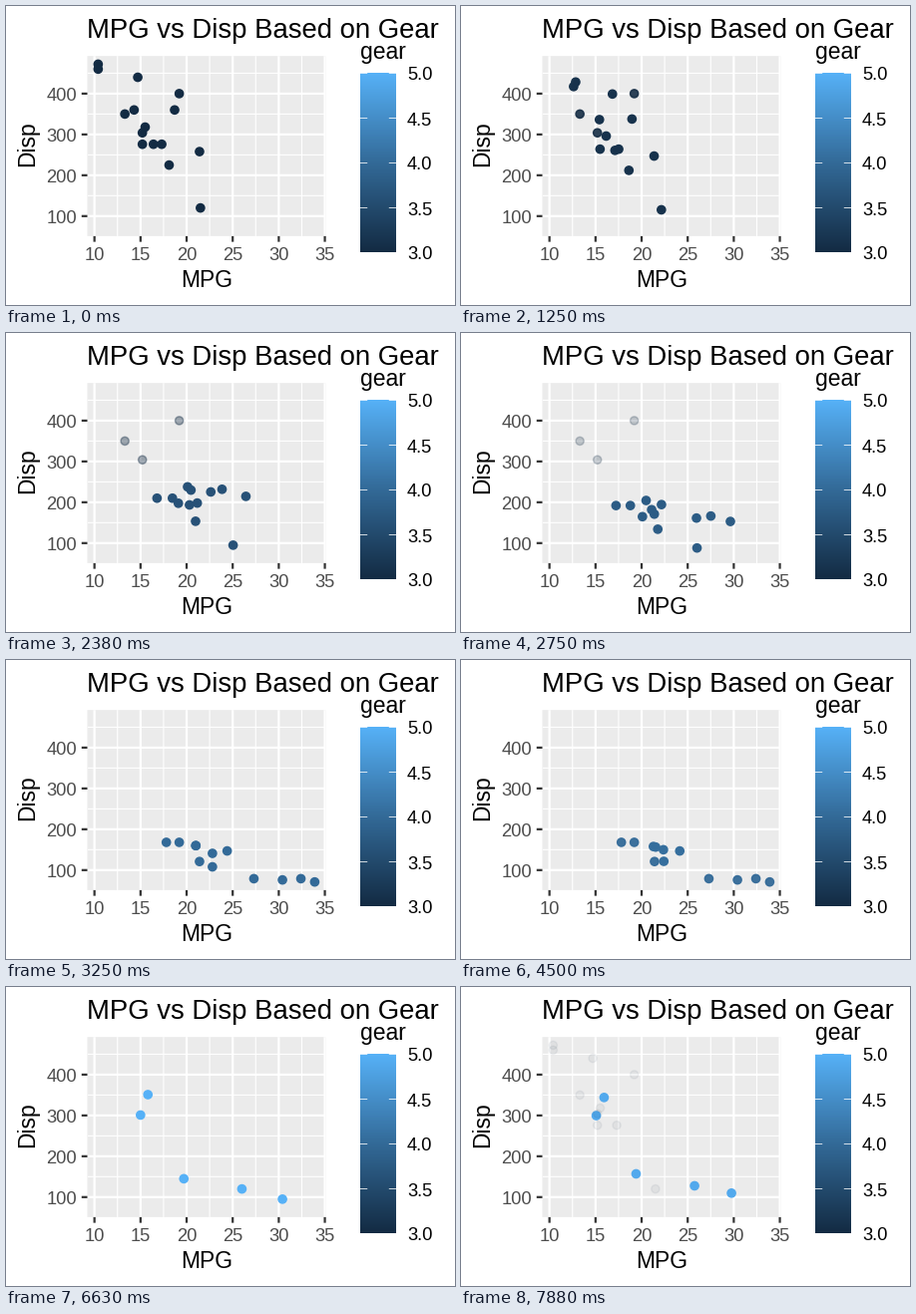
Write a matplotlib script that moves like this. It is 450 px wide and 300 px high and loops after 8 s.

```python
import numpy as np
import matplotlib.pyplot as plt
from matplotlib.animation import FuncAnimation
from matplotlib.colors import LinearSegmentedColormap
from matplotlib.patches import Rectangle

W, H, DPI = 450, 300, 150
HOLD, MOVE = 9, 18                      # frames per state and per transition
FRAMES, INTERVAL = 64, 125

# One (miles per gallon, displacement) point per car, grouped by gear
CARS = {
    3: [(21.4, 258), (18.7, 360), (18.1, 225), (14.3, 360), (16.4, 276),
        (17.3, 276), (15.2, 276), (10.4, 472), (10.4, 460), (14.7, 440),
        (21.5, 120), (15.5, 318), (15.2, 304), (13.3, 350), (19.2, 400)],
    4: [(21, 160), (21, 160), (22.8, 108), (24.4, 147), (22.8, 141), (19.2, 168),
        (17.8, 168), (32.4, 79), (30.4, 76), (33.9, 71), (27.3, 79), (21.4, 121)],
    5: [(26, 120), (30.4, 95), (15.8, 351), (19.7, 145), (15, 301)],
}
GEARS = list(CARS)
GROUPS = [np.array(CARS[g], float) for g in GEARS]

# Axis limits: the data range widened by 5 % on each side
EVERY = np.vstack(GROUPS)
PAD = 0.05 * np.ptp(EVERY, axis=0)
LOW, HIGH = EVERY.min(axis=0) - PAD, EVERY.max(axis=0) + PAD

LEFT, RIGHT, TOP, BOTTOM = 81.5, 320.25, 50.2, 230.9
BAR_X, BAR_Y, BAR_W, BAR_H = 355, 67.5, 36, 180
TICK, GRID = 5.73, 2.22
DARK, GREY = "#333333", "#4D4D4D"
SMALL, MEDIUM, LARGE = 8.8, 11, 13.2

cmap = LinearSegmentedColormap.from_list("gear", ["#132B43", "#336A98", "#56B1F7"], N=512)


def gear_color(gear, alpha=1.0):
    return cmap((gear - GEARS[0]) / (GEARS[-1] - GEARS[0]), alpha=alpha)


def px(x):
    return LEFT + (x - LOW[0]) / (HIGH[0] - LOW[0]) * (RIGHT - LEFT)


def py(y):
    return BOTTOM - (y - LOW[1]) / (HIGH[1] - LOW[1]) * (BOTTOM - TOP)


def pt(pixels):
    return pixels * 72 / DPI


plt.rcParams["font.family"] = "Liberation Sans"
fig = plt.figure(figsize=(W / DPI, H / DPI), dpi=DPI, facecolor="white")
ax = fig.add_axes([0, 0, 1, 1])
ax.set_axis_off()

panel = Rectangle((LEFT, TOP), RIGHT - LEFT, BOTTOM - TOP, fc="#EBEBEB",
                  lw=0, snap=False, zorder=0)
ax.add_patch(panel)


def line(xs, ys, width, color="white", clip=False):
    item, = ax.plot(xs, ys, color=color, lw=pt(width), snap=False,
                    solid_capstyle="butt", zorder=2)
    if clip:
        item.set_clip_path(panel)


def label(x, y, text, size, color="black", ha="left", rotation=0):
    ax.text(x, y, text, fontsize=size, color=color, ha=ha, va="baseline",
            rotation=rotation, rotation_mode="anchor")


def grid_x(x, width):
    line([px(x)] * 2, [TOP, BOTTOM], width, clip=True)


def grid_y(y, width):
    line([LEFT, RIGHT], [py(y)] * 2, width, clip=True)


def draw_axes():
    for x in np.arange(12.5, 35, 5):
        grid_x(x, GRID / 2)
    for y in range(150, 500, 100):
        grid_y(y, GRID / 2)
    for x in range(10, 36, 5):
        grid_x(x, GRID)
        line([px(x)] * 2, [BOTTOM, BOTTOM + TICK], GRID, DARK)
        label(px(x), BOTTOM + 24, str(x), SMALL, GREY, "center")
    for y in range(100, 401, 100):
        grid_y(y, GRID)
        line([LEFT - TICK, LEFT], [py(y)] * 2, GRID, DARK)
        label(LEFT - 10.3, py(y) + 6.7, str(y), SMALL, GREY, "right")
    label(LEFT - 0.6, 32, "MPG vs Disp Based on Gear", LARGE)
    label((LEFT + RIGHT) / 2, 282.4, "MPG", MEDIUM, ha="center")
    label(28, (TOP + BOTTOM) / 2 - 2, "Disp", MEDIUM, ha="center", rotation=90)


def draw_legend():
    right, bottom = BAR_X + BAR_W, BAR_Y + BAR_H
    ax.imshow(np.linspace(1, 0, 300)[:, None], cmap=cmap, aspect="auto",
              extent=(BAR_X, right, bottom, BAR_Y), interpolation="bilinear", zorder=1)
    for i in range(5):
        y = bottom - i * BAR_H / 4
        line([BAR_X, BAR_X + BAR_W / 5], [y, y], 0.78)
        line([right - BAR_W / 5, right], [y, y], 0.78)
        label(402, y + 7, f"{GEARS[0] + i / 2:.1f}", SMALL)
    label(BAR_X, 53, "gear", MEDIUM)


draw_axes()
draw_legend()
ax.set_xlim(0, W)
ax.set_ylim(H, 0)
dots = ax.scatter([], [], s=pt(2 * 4.07) ** 2, linewidths=pt(1.48),
                  snap=False, zorder=3)


def update(k):
    turn, step = divmod(k, HOLD + MOVE)
    p = max(0, step - HOLD + 1) / MOVE
    i, j = turn % len(GEARS), (turn + 1) % len(GEARS)
    a, b = GROUPS[i], GROUPS[j]

    # Paired cars travel, surplus cars fade out or in where they stand
    n = min(len(a), len(b))
    gear = GEARS[i] + (GEARS[j] - GEARS[i]) * p
    pos = np.vstack([a[:n] + (b[:n] - a[:n]) * p, a[n:], b[n:]])
    colors = ([gear_color(gear)] * n
              + [gear_color(GEARS[i], 1 - p)] * (len(a) - n)
              + [gear_color(GEARS[j], p)] * (len(b) - n))
    dots.set_offsets(np.column_stack([px(pos[:, 0]), py(pos[:, 1])]))
    dots.set_facecolors(colors)
    dots.set_edgecolors(colors)
    return dots,


anim = FuncAnimation(fig, update, frames=FRAMES, interval=INTERVAL,
                     init_func=lambda: update(0), repeat=True, repeat_delay=0)
plt.show()
```
